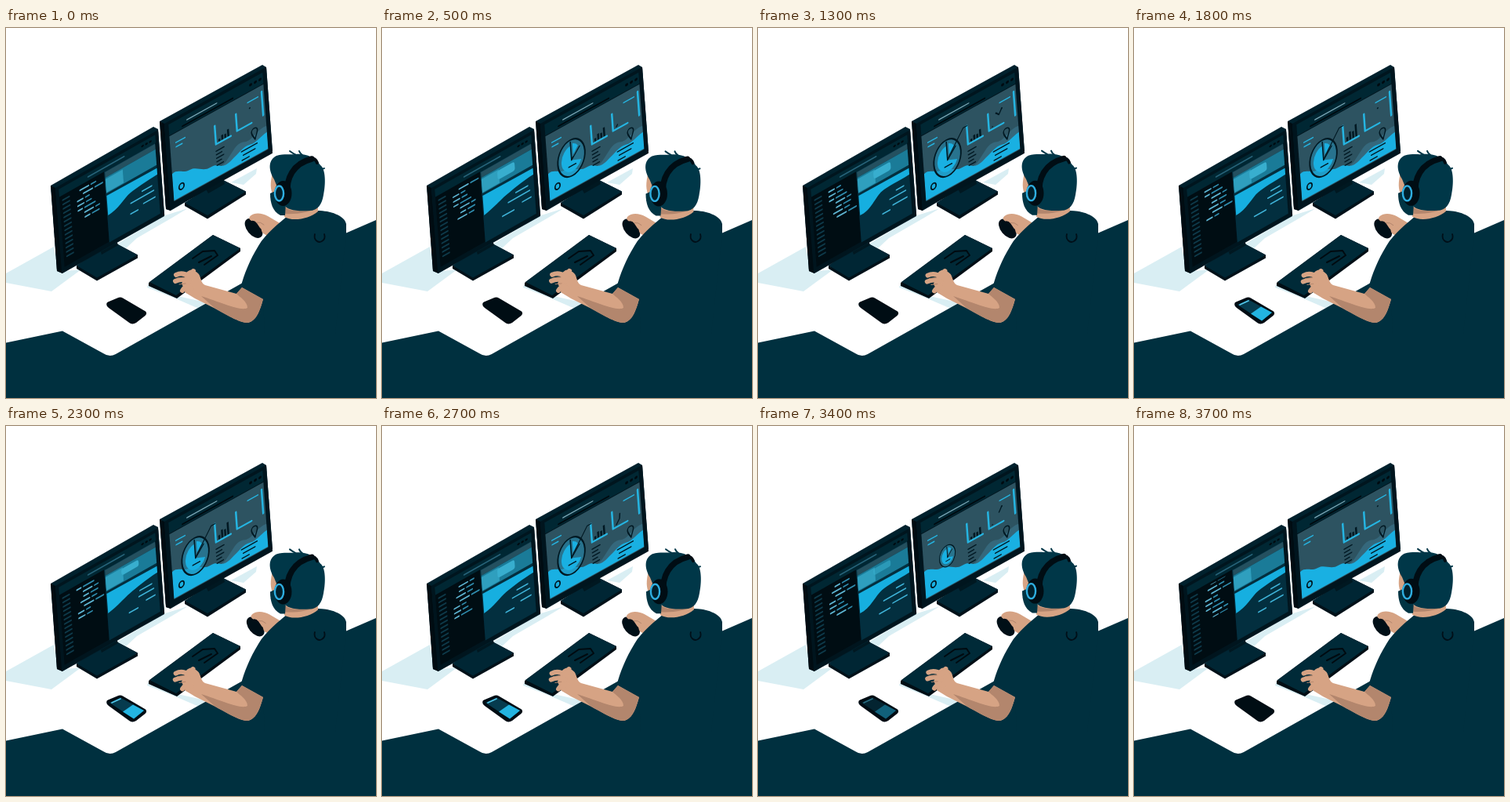
Recreate the animation shown at these times as an HTML page. Size 472 by 472 pixels, loop 3.8 s.

```html
<!DOCTYPE html>
<html lang="en">
<head>
<meta charset="utf-8">
<title>Desk</title>
<style>
html, body { margin: 0; width: 100%; height: 100%; overflow: hidden; background: #fff; }
svg { display: block; width: 100vw; height: 100vh; }
.line { fill: none; stroke-linecap: round; stroke-linejoin: round; }
.ink { stroke: #001822; }
.cyan { stroke: #25b5e2; }
</style>
</head>
<body>
<svg viewBox="0 0 472 472">
  <defs>
    <clipPath id="codeClip"><rect x="23" y="17" width="38" height="42"/></clipPath>
    <clipPath id="chartClip"><path d="M5 19H125V101H5Z"/></clipPath>
  </defs>

  <!-- desk and shadows -->
  <g fill="#d9eef3">
    <path d="M0 313L61 279 67 311 96 308 58 336 0 325Z"/>
    <path d="M139 277L203 239 232 230 212 242 167 268 153 281Z"/>
    <path d="M287 197L320 179 319 186 303 200Z"/>
    <path d="M181 327L219 342 255 350 246 358 216 345 180 331Z"/>
  </g>
  <path fill="#00303f" d="M0 401.5L72 386.5 124 415Q132 420.5 140 416L302 325 360 298 434 261.5 472 245V472H0Z"/>

  <!-- left monitor -->
  <path fill="#001119" d="M90 303L137 273 168 289.5V293.5L116 322.5 90 307Z"/>
  <path fill="#002634" d="M90 303L137 273 168 289.5 116 318.5Z"/>
  <path fill="#001821" d="M118 276L139 265 143 277 122 289Z"/>
  <path fill="#00212d" d="M57 201L188 126 194 129 202 240 72 313 65 310Z"/>
  <path fill="#000c12" d="M57 201L63 204 72 313 65 310Z"/>
  <g transform="matrix(1 -.565 .075 1 63 204)">
    <path fill="#00151e" d="M0 0H131V109H0Z"/>
    <path fill="#002733" d="M4 4H127V14H4Z"/>
    <path class="line" stroke="#28647a" stroke-width="1.6" d="M41 9H87"/>
    <path class="line" stroke="#000a10" stroke-width="2.4" d="M110 9h1M115 9h1M120 9h1"/>
    <path fill="#000d13" d="M4 14H61V103H4Z"/>
    <path fill="#032f3f" d="M61 14H126V104H61Z"/>
    <path class="line" stroke="#0e3a4a" stroke-width="2" d="M8 20h8m-8 5.5h8m-8 5.5h8m-8 5.5h8m-8 5.5h8m-8 5.5h8m-8 5.5h8m-8 5.5h8m-8 5.5h8m-8 5.5h8m-8 5.5h8m-8 5.5h8m-8 5.5h8m-8 5.5h8"/>
    <g clip-path="url(#codeClip)"><g id="code" class="line" stroke-width="1.9"></g></g>
    <path fill="#24505f" d="M62 15H126V22H62Z"/>
    <path fill="#1a7b98" d="M62 22H126V42H62Z"/>
    <path fill="#2f9fbe" d="M62 24H84V41H62Z"/>
    <rect id="tile" x="82" y="25" width="22" height="12" rx="3" fill="#38aece"/>
    <path id="band" fill="#16afe0"/>
    <g id="notes" class="line" stroke="#3fb3d8" stroke-width="1.7"></g>
  </g>

  <!-- right monitor -->
  <path fill="#001119" d="M228 223L275 193 306 208.5V212.5L257 243.5 228 227Z"/>
  <path fill="#002634" d="M228 223L275 193 306 208.5 257 239Z"/>
  <path fill="#001821" d="M252 200L276 188 279 199 258 211Z"/>
  <path fill="#00212d" d="M196 119L327 47 332 50 340 157 210 233 204 231Z"/>
  <path fill="#000c12" d="M196 119L202 122 210 233 204 231Z"/>
  <g transform="matrix(1 -.555 .073 1 202 122)">
    <path fill="#00151e" d="M0 0H130V110H0Z"/>
    <path fill="#002733" d="M5 4H125V18H5Z"/>
    <path class="line" stroke="#7ba7b6" stroke-width="1.4" d="M28 10.5H66"/>
    <path class="line" stroke="#000a10" stroke-width="2" d="M22 15.5H86"/>
    <path class="line" stroke="#000a10" stroke-width="3.4" d="M109 11h.5M115 11h.5M121 11h.5"/>
    <path fill="#2d5361" d="M5 19H125V102H5Z"/>
    <g clip-path="url(#chartClip)">
      <path fill="#35687c" d="M42 92C56 88 65 95 75 86S88 73 97 77 112 70 125 72V102H42Z"/>
      <path fill="#19b0e2" d="M5 67C12 64 18 74 27 74S43 86 53 85 65 96 78 91 94 82 103 84 116 81 125 80V102H5Z"/>
    </g>
    <path class="line cyan" stroke-width="1.6" d="M12.5 31H24M12.5 36.5H20M104 31H117"/>
    <path class="line cyan" stroke-width="2.4" d="M61.5 37V60.5H80.5M88.5 37V58.5H107M122 27V57"/>
    <path class="line ink" stroke-width="1.5" d="M61 69H71M61 73.5H68M61 78H70M61 82.5H67M61 87H69M92 87H112M94 92.5H109M92 98H101"/>
    <path class="line ink" stroke-width="1.5" d="M110 81C108 76 106 74 106 70.5A3.7 3.7 0 0 1 113.5 70.5C113.5 74 111 76 110 81Z"/>
    <ellipse class="line ink" stroke-width="1.7" cx="15.5" cy="88.5" rx="3.2" ry="3.8"/>
    <path id="bars" class="line ink" stroke-width="2.4" style="stroke-linecap:butt"/>
    <path id="trend" class="line ink" stroke-width="1.5" pathLength="100" d="M93 55.5L97.4 50 98.5 41 102 45 106 39"/>
    <circle id="dot" cx="106" cy="39" r="1" fill="#001822"/>
    <g id="pie">
      <ellipse rx="17.2" ry="22.5" fill="#268fb2" fill-opacity=".55" stroke="#001822" stroke-width="1.9"/>
      <path fill="#19b0e2" d="M0 3V-15A13 16 0 1 0 12 8Z"/>
      <path class="line ink" stroke-width="1.5" d="M0 -20V3L11 -9M-4 10H5"/>
      <path fill="#19b0e2" d="M2.5-3V-17A13 16 0 0 1 9-11Z"/>
    </g>
    <path id="lead" class="line ink" stroke-width="1.3" pathLength="100" d="M35 65L57 37H62"/>
  </g>

  <!-- keyboard and phone -->
  <path fill="#000e15" d="M182 325L264 264 299 281V285L218 345 182 329Z"/>
  <path fill="#002a38" d="M183 324L264 264 299 281 217 341Z"/>
  <path class="line" stroke="#000a10" stroke-width="2" d="M238 294L251 285 266 284 270 290 253 302M246 299L262 291"/>
  <path fill="#000d14" d="M129 355Q127 351 130 349.5L142 344.5Q146 342.5 149 344.5L178 361.5Q180.5 364 177.500 367L166 376Q162 378.5 158 376.500L131 357Z"/>
  <g id="phone">
    <path fill="#063b4e" d="M132 353L146 346.5 176 363 163 373.500Z"/>
    <path fill="#23b4e1" d="M149 364.500L162 355.500 176 363 163 373.500Z"/>
    <path class="line" stroke="#53c8eb" stroke-width="1.7" d="M135 353L146 348"/>
  </g>

  <!-- person -->
  <g id="mouse">
    <ellipse cx="317" cy="255.500" rx="14.500" ry="8.500" transform="rotate(50 317 255.500)" fill="#000f17"/>
    <path fill="#d6a384" d="M313 239.500C318 235 328 236 335 240L352 250 337 267C333 265 332 263 329 262 326 259 328 257 325 255L321 249Q318 245 314 246 309 243 313 239.500Z"/>
    <path class="line" stroke="#b3866d" stroke-width="1" d="M321 248Q326 247 330 251"/>
  </g>
  <path fill="#00303f" d="M361 238C350 248 331 262 322 278 311 296 304 313 299 332L328 346 330 390H420L434 261.500V250C432 239 413 233 398 233Z"/>
  <path class="line" stroke="#000f18" stroke-width="1.8" d="M394 263C392 270 398 275 403 272Q408 269 406 263"/>
  <g id="head">
    <path fill="#d6a384" d="M341 180C338 193 336 202 340 212L356 228 355 241C365 247 387 244 398 234L397 211Z"/>
    <path fill="#b3866d" d="M356 229C367 237 384 232 397 220L398 229C389 235 370 238 356 237Z"/>
    <path fill="#003443" d="M337 211C337 223 340 234 350 239L356 239 357 223 348 206Z"/>
    <path fill="#003748" d="M342 193C334 180 335 168 345 163 355 160 363 162 370 161 382 160 395 165 401 175 408 180 408 199 405 213 403 225 398 233 387 233 370 234 357 232 355 225Z"/>
    <path class="line" stroke="#003748" stroke-width="2" d="M370 162Q366 160 362 157M378 162Q375 160 374 157M398 176Q403 181 406 179"/>
    <path class="line" stroke="#000d14" stroke-width="7.500" d="M359 213C357 192 366 173 390 167"/>
    <path class="line" stroke="#000d14" stroke-width="4" d="M388 166Q395 166 397 172"/>
    <ellipse cx="353.500" cy="211" rx="11" ry="16" fill="#000d14"/>
    <ellipse cx="348.500" cy="211" rx="5.600" ry="9.500" fill="#00202c" stroke="#2eaee0" stroke-width="2.400"/>
  </g>
  <path fill="#d6a384" d="M230 316L245 314C249 319 249 326 254 328L294 339 301 331 328 346C324 360 320 373 309 376 300 377 282 366 267 358L241 345 228 337Z"/>
  <path fill="#b3866d" d="M249 342C274 350 300 362 308 357 308 349 298 343 294 339L301 331 328 346C324 360 320 373 309 376 299 377 280 365 267 358Z"/>
  <g id="hand">
    <path fill="#d6a384" d="M230 312Q236 306 241 310 247 313 248 319L251 332 243 345 230 338 224 326Z"/>
    <path class="line" stroke="#d6a384" stroke-width="6" d="M237 315L239 310M234 317Q225 311 217 315M234 323Q224 319 216 323M237 332Q230 327 225 335"/>
    <path class="line" stroke="#b3866d" stroke-width="1" d="M219 319L228 318M221 327L229 326"/>
  </g>
</svg>
<script>
const LOOP = 3800, STEP = 100;
const el = id => document.getElementById(id);
const clamp = x => Math.max(0, Math.min(1, x));
const ease = x => x * x * (3 - 2 * x);
const ramp = (t, a, b) => ease(clamp((t - a) / (b - a)));
const pulse = (t, a, b, c, d) => ramp(t, a, b) * (1 - ramp(t, c, d));
const wave = (t, n, phase = 0) => Math.sin((t / LOOP * n + phase) * 2 * Math.PI);
const rand = n => { const x = Math.sin(n * 91.7 + 3) * 4375.5; return x - Math.floor(x); };
const set = (id, name, value) => el(id).setAttribute(name, value);

const ROWS = 7, GAP = 6;
let rows = "";
for (let i = 0; i < ROWS * 2; i++) {
  const n = i % ROWS, y = 20 + i * GAP;
  const x = 26 + Math.floor(rand(n) * 3) * 4;
  const mid = x + 4 + rand(n + 20) * 8;
  const end = Math.min(58, mid + 6 + rand(n + 40) * 12);
  rows += `<path stroke="#5db3d0" d="M${x} ${y}H${mid}"/><path stroke="#2f8bac" d="M${mid + 3.5} ${y}H${end}"/>`;
}
el("code").innerHTML = rows;

// start, end, height, cycles per loop
const NOTES = [[103, 118, 64, 2], [91, 120, 71, 1], [103, 121, 80, 2], [84, 99, 84, 3]];
el("notes").innerHTML = NOTES.map(() => "<path/>").join("");

function trim(id, from, to) {
  set(id, "stroke-dasharray", `0 ${from} ${Math.max(0, to - from)} 200`);
  el(id).style.visibility = to - from > .5 ? "visible" : "hidden";
}

function draw(t) {
  // code advances one row at a time
  const p = t / LOOP * ROWS;
  const row = Math.floor(p) + ramp(p % 1, .6, 1);
  set("code", "transform", `translate(0 ${-row * GAP})`);

  const on = pulse(t, 100, 500, 3200, 3650);
  set("tile", "opacity", on);
  set("tile", "height", 10 + 2 * wave(t, 3));
  const b = 2.5 * wave(t, 2) * on;
  set("band", "d", `M62 45L126 46V54C111 55 99 ${56 + b} 91 ${58 + b}S75 ${70 - b} 62 70Z`);
  [...el("notes").children].forEach((line, i) => {
    const [a, z, y, n] = NOTES[i];
    const k = .8 + .2 * wave(t, n, i / 4);
    line.setAttribute("d", `M${z - (z - a) * k} ${y}H${z}`);
  });

  set("pie", "transform", `translate(35 63) scale(${on})`);
  el("pie").style.visibility = on > .01 ? "visible" : "hidden";
  trim("lead", 0, 100 * pulse(t, 400, 1000, 3000, 3450));

  const grow = 1 + .7 * pulse(t, 1300, 1800, 2300, 3000) + .25 * pulse(t, 200, 500, 900, 1300);
  set("bars", "d", [3, 6, 5, 9].map((h, i) => `M${66 + i * 3.8} 59v${-h * grow}`).join(""));

  const s = t < 2200 ? t - 350 : t - 2300;
  trim("trend", 100 * ramp(s, 450, 1400), 100 * ramp(s, 0, 850));
  set("dot", "opacity", s > 850 || t < 200 ? 1 : 0);

  el("phone").style.opacity = pulse(t, 1400, 1700, 3250, 3550);

  const m = pulse(t, 100, 450, 2700, 3100);
  set("mouse", "transform", `translate(${2 * m - 1 + .5 * wave(t, 4) * m} ${m * .5})`);
  set("head", "transform", `translate(${-.5 * pulse(t, 100, 500, 800, 1300)} ${.4 * wave(t, 2)})`);
  set("hand", "transform", `rotate(${1.3 * wave(t, 8)} 246 334)`);
}

function tick(now) {
  draw(Math.floor(now % LOOP / STEP) * STEP);
  requestAnimationFrame(tick);
}
draw(0);
requestAnimationFrame(tick);
</script>
</body>
</html>
```
